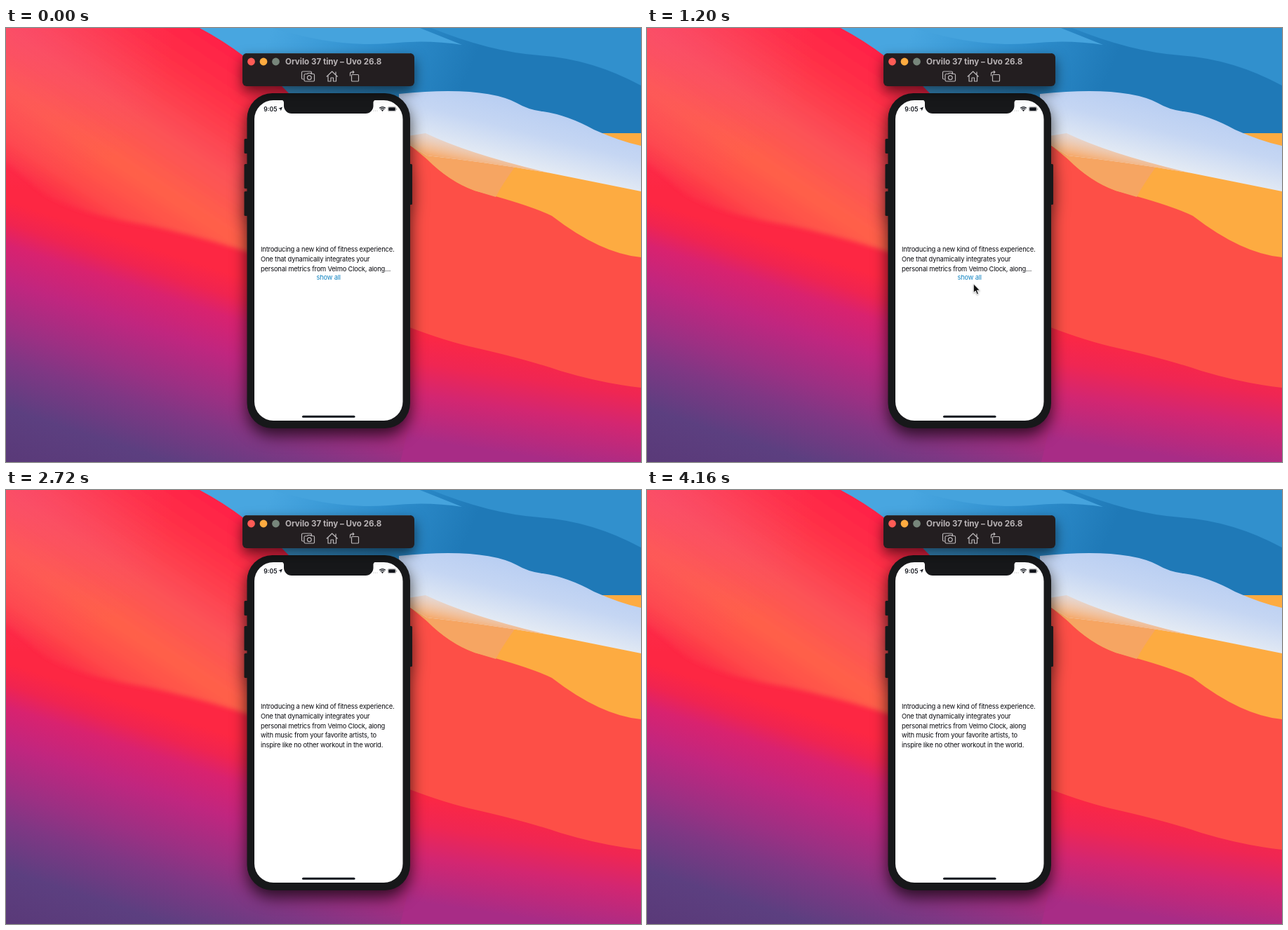
An HTML page that plays this animation: 905x619 px, repeating every 4.24 s.

```html
<!DOCTYPE html>
<html lang="en">
<head>
<meta charset="utf-8">
<title>Show all</title>
<style>
  html, body { margin: 0; width: 100%; height: 100%; overflow: hidden; background: #fd4f47; }
  svg { display: block; width: 100vw; height: 100vh; }
  text { font-family: Inter, Roboto, sans-serif; }
  .copy text { font-size: 9.4px; letter-spacing: -.2px; fill: #0b0b10; }
  .copy .link { fill: #1385c2; text-anchor: middle; }
  .icons { fill: none; stroke: #bcb8ba; stroke-width: 1.2; stroke-linejoin: round; }
  #phone { filter: drop-shadow(0 10px 11px rgba(0, 0, 0, .72)); }
  #bar { filter: drop-shadow(0 8px 9px rgba(0, 0, 0, .6)); }
  #cursor { filter: drop-shadow(0 1px 1px rgba(0, 0, 0, .3)); }
</style>
</head>
<body>
<svg viewBox="0 0 905 619" preserveAspectRatio="none">
  <defs>
    <linearGradient id="dusk" gradientUnits="userSpaceOnUse" x1="0" y1="0" x2="-186" y2="570">
      <stop offset=".39" stop-color="#fd2743"/>
      <stop offset=".44" stop-color="#f02450"/>
      <stop offset=".49" stop-color="#d9226f"/>
      <stop offset=".575" stop-color="#c0267f"/>
      <stop offset=".68" stop-color="#9b3083"/>
      <stop offset=".75" stop-color="#7f3784"/>
      <stop offset=".86" stop-color="#5c3f80"/>
      <stop offset=".97" stop-color="#5a3a79"/>
    </linearGradient>
    <linearGradient id="coral" gradientUnits="userSpaceOnUse" x1="276" y1="0" x2="104" y2="260">
      <stop offset="0" stop-color="#ff2246"/>
      <stop offset=".2" stop-color="#ff3047"/>
      <stop offset=".48" stop-color="#fc5157"/>
      <stop offset=".72" stop-color="#ff6049"/>
      <stop offset=".9" stop-color="#fe4a48"/>
      <stop offset="1" stop-color="#fd3246"/>
    </linearGradient>
    <radialGradient id="blush" gradientUnits="userSpaceOnUse" cx="20" cy="10" r="220">
      <stop offset="0" stop-color="#f94a78" stop-opacity=".5"/>
      <stop offset="1" stop-color="#f94a78" stop-opacity="0"/>
    </radialGradient>
    <linearGradient id="plum" gradientUnits="userSpaceOnUse" x1="0" y1="0" x2="-73" y2="489">
      <stop offset=".7" stop-color="#fb2745"/>
      <stop offset=".78" stop-color="#ef2653"/>
      <stop offset=".87" stop-color="#d32671"/>
      <stop offset="1" stop-color="#a82c86"/>
    </linearGradient>
    <linearGradient id="sky" gradientUnits="userSpaceOnUse" x1="380" y1="0" x2="640" y2="110">
      <stop offset="0" stop-color="#48a6e0"/>
      <stop offset=".55" stop-color="#2f8fce"/>
      <stop offset="1" stop-color="#1f79b7"/>
    </linearGradient>
    <linearGradient id="mist" gradientUnits="userSpaceOnUse" x1="740" y1="100" x2="715" y2="200">
      <stop offset="0" stop-color="#b7cdf2"/>
      <stop offset=".45" stop-color="#c5d6f3"/>
      <stop offset="1" stop-color="#e9eef4"/>
    </linearGradient>
    <linearGradient id="peach" gradientUnits="userSpaceOnUse" x1="610" y1="150" x2="603" y2="184">
      <stop offset="0" stop-color="#eec9b4" stop-opacity=".4"/>
      <stop offset="1" stop-color="#f6a562"/>
    </linearGradient>
    <filter id="soft"><feGaussianBlur stdDeviation="3"/></filter>
  </defs>

  <!-- wallpaper -->
  <rect width="905" height="619" fill="url(#dusk)"/>
  <path filter="url(#soft)" fill="url(#coral)" d="M-20-20H420V345Q300 302 200 281Q85 262 45 228Q20 206-20 178Z"/>
  <rect width="240" height="230" fill="url(#blush)"/>
  <path fill="#fd4f47" d="M560 140H905V530H560Z"/>
  <path fill="url(#plum)" d="M560 421Q615 443 660 454Q740 472 790 489Q850 507 905 513V619H562L576 560Z"/>
  <path fill="url(#sky)" d="M276 0Q310 18 340 41Q380 68 405 95L560 140L905 190V0Z"/>
  <path fill="#3190cd" d="M606 0Q690 34 760 39Q835 44 905 82V0Z"/>
  <path fill="#45a3dd" d="M380 0Q470 28 545 22Q600 16 650 24Q610 8 590 0Z"/>
  <path fill="#fdab41" d="M560 156Q578 168 600 187Q632 219 668 232Q745 252 778 268Q848 322 905 327V150H560Z"/>
  <path fill="#f6a562" d="M560 156Q578 168 600 187Q632 219 668 232L698 241Q706 225 724 200V150H560Z"/>
  <path fill="url(#mist)" d="M560 94Q680 82 728 107Q745 117 765 119Q800 124 838 145Q876 162 905 168V233L776 207Q690 192 600 182L577 168L560 156Z"/>
  <path fill="url(#peach)" d="M560 156L598 150Q660 180 776 207Q690 192 600 182L577 168Z"/>

  <g id="phone">
    <g fill="#17181a">
      <rect x="339.5" y="158" width="6" height="21" rx="1.5"/>
      <rect x="339.5" y="194" width="6" height="35" rx="1.5"/>
      <rect x="339.5" y="233" width="6" height="35" rx="1.5"/>
      <rect x="573" y="194" width="6" height="58" rx="1.5"/>
      <rect x="343.5" y="93" width="232.5" height="478" rx="36"/>
    </g>
    <rect x="354" y="103" width="211.5" height="457" rx="27" fill="#fff"/>
    <path fill="#17181a" d="M392 102.5A4 4 0 0 1 396 107V111A11 11 0 0 0 407 122H512.5A11 11 0 0 0 523.5 111V107A4 4 0 0 1 527.5 102.5Z"/>
    <rect x="422" y="552.7" width="75.5" height="3" rx="1.5" fill="#0d141d"/>
  </g>

  <g id="bar">
    <rect x="337" y="36" width="245" height="47" rx="6" fill="#231e20"/>
    <path d="M343 36.3H576" stroke="#45484c" stroke-width=".6"/>
    <circle cx="349.5" cy="48" r="5.4" fill="#fe5c56"/>
    <circle cx="367" cy="48" r="5.4" fill="#fdab40"/>
    <circle cx="384.5" cy="48" r="5.4" fill="#77867b"/>
    <text x="398" y="51.8" font-size="11.6" font-weight="700" fill="#b9b4b6">Orvilo 37 tiny – Uvo 26.8</text>
    <g class="icons">
      <path d="M424.5 73H423Q421.5 73 421.5 71.5V63.5Q421.5 62 423 62H434Q435.5 62 435.5 63.5V65"/>
      <path d="M427 65.5H429.5L430.5 64.5H434L435 65.5H438Q439.5 65.5 439.5 67V74.5Q439.5 76 438 76H427Q425 76 425 74.5V67Q425 65.5 427 65.5Z"/>
      <circle cx="432.3" cy="70.7" r="2.9"/>
      <path d="M456.8 69.5L464.7 62L472.6 69.5M459 68V76H463V71H466.5V76H470.5V68M470 66.5V62.5"/>
      <rect x="492.5" y="66.5" width="10" height="9.5" rx="1"/>
      <path d="M490.5 68.5V65Q490.5 62.8 493 62.8H496M494 60.8L496 62.8L494 64.8"/>
    </g>
  </g>

  <g fill="#10131a">
    <text x="367.3" y="118.9" font-size="8.6" font-weight="600">9:05</text>
    <path d="M394 112.5L391.7 118.2L390.9 115.6L388.2 114.9Z"/>
    <g fill="#aaa"><circle cx="524" cy="118" r=".6"/><circle cx="526.5" cy="118" r=".6"/><circle cx="529" cy="118" r=".6"/></g>
    <path d="M536.5 119L534.8 117.2Q536.5 115.9 538.2 117.2Z"/>
    <path fill="none" stroke="#10131a" stroke-width="1.3" d="M533.7 116Q536.5 113.7 539.3 116M532.2 114.3Q536.5 110.8 540.8 114.3"/>
    <rect x="544.3" y="112.4" width="11.4" height="6.4" rx="1.8" fill="none" stroke="#888" stroke-width=".6"/>
    <rect x="545.2" y="113.3" width="9.6" height="4.6" rx="1"/>
    <rect x="556.3" y="114.5" width=".9" height="2.2" rx=".4" fill="#888"/>
  </g>

  <g class="copy" id="copy"></g>
  <path id="cursor" fill="#111" stroke="#fff" stroke-width=".9" d="M0 0V13L2.9 10.3L5 15.2L7.2 14.3L5.2 9.5H9.2Z"/>
</svg>
<script>
  const LOOP = 4240, STEP = 80, EXPAND = 1600;
  const lines = [
    'Introducing a new kind of fitness experience.',
    'One that dynamically integrates your',
    'personal metrics from Velmo Clock, along',
    'with music from your favorite artists, to',
    'inspire like no other workout in the world.'
  ];
  // pointer keys: time, x, y
  const path = [
    [160, 505, 640], [640, 480.5, 478], [1120, 465, 365],
    [1680, 467, 363], [2080, 467, 363], [2560, 505, 640]
  ];
  const copy = document.getElementById('copy');
  const cursor = document.getElementById('cursor');

  const row = (s, i, top) => `<text x="363" y="${top + i * 13.8}">${s}</text>`;
  const full = lines.map((s, i) => row(s, i, 312)).join('');
  const short = lines.slice(0, 3).map((s, i) => row(i === 2 ? s + '…' : s, i, 319)).join('') +
    '<text class="link" x="459.7" y="359.4">show all</text>';
  let shown;

  function pointerAt(t) {
    const i = path.findIndex(key => key[0] > t);
    if (i < 1) return null;
    const [t0, x0, y0] = path[i - 1], [t1, x1, y1] = path[i];
    const k = (t - t0) / (t1 - t0);
    return [x0 + (x1 - x0) * k, y0 + (y1 - y0) * k];
  }

  function draw(now) {
    const t = Math.floor(now % LOOP / STEP) * STEP;
    const html = t < EXPAND ? short : full;
    if (html !== shown) copy.innerHTML = shown = html;
    const pos = pointerAt(t);
    cursor.style.visibility = pos ? 'visible' : 'hidden';
    if (pos) cursor.setAttribute('transform', `translate(${pos})`);
    requestAnimationFrame(draw);
  }
  draw(performance.now());
</script>
</body>
</html>
```
